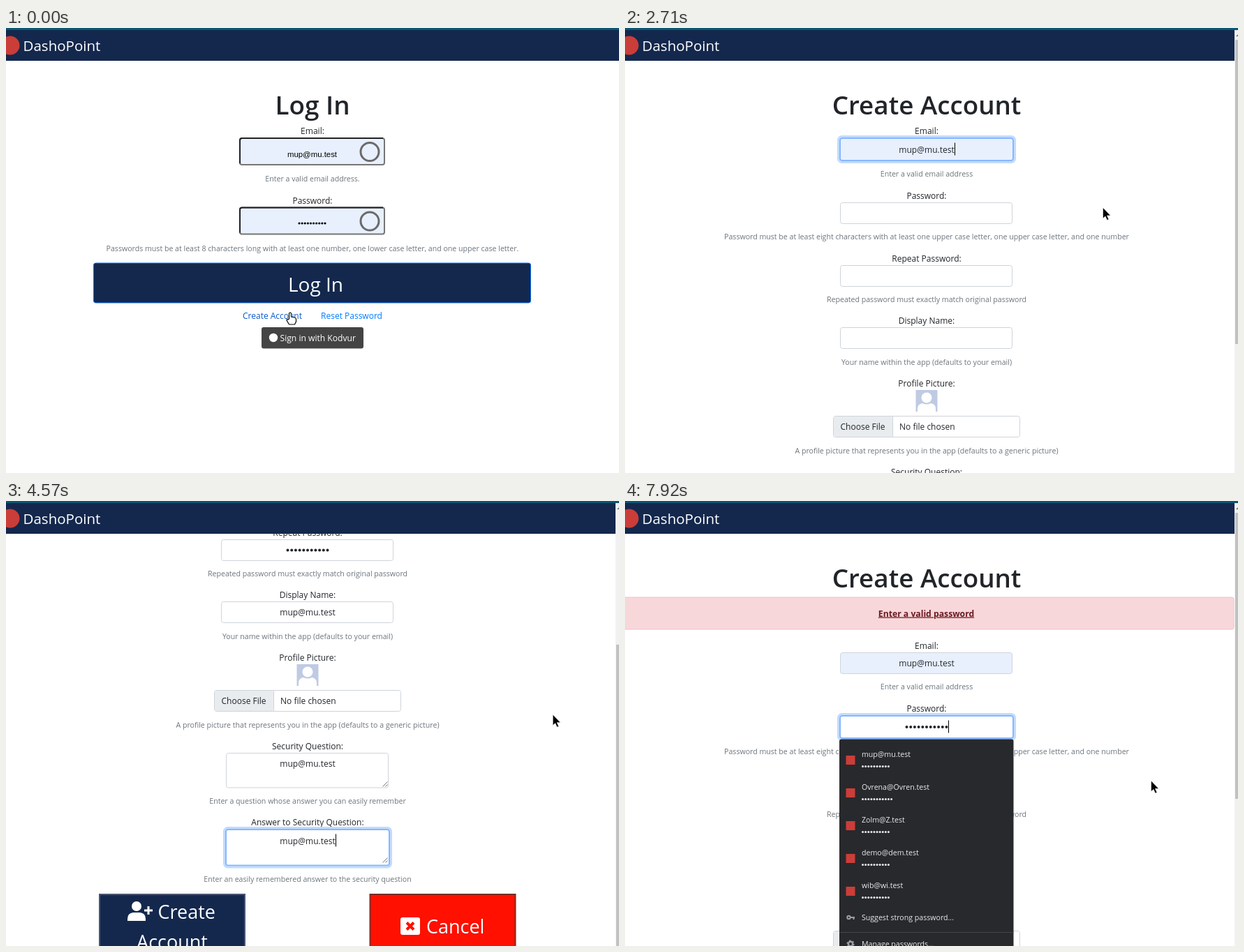
An HTML page for the animation above (8 s loop, 878 px wide and 638 px high).

```html
<!DOCTYPE html>
<html lang="en">
<head>
<meta charset="utf-8">
<title>Create account</title>
<style>
  html, body { margin: 0; width: 100%; height: 100%; overflow: hidden; background: #fff; }
  svg { display: block; font: 12px 'Open Sans', 'Noto Sans', sans-serif; }
</style>
</head>
<body>
<svg id="stage" width="878" height="638" viewBox="0 0 878 638"></svg>
<script>
const LOOP = 8000, NAVY = '#14284d', INK = '#212529', GREY = '#6c757d', RED = '#cb3d38';
const MAIL = 'mup@mu.test';
const stage = document.getElementById('stage');
const ruler = document.createElement('canvas').getContext('2d');

// Screen updates come in bursts: first time, last time, count
const ticks = [[0, 0, 1], [150, 1090, 7], [1210, 2170, 8], [2320, 3220, 8], [3370, 4300, 8],
  [4420, 5380, 8], [5500, 6530, 8], [6650, 6650, 1], [6920, 6920, 1], [7200, 7920, 6]]
  .flatMap(([a, b, n]) => Array.from({ length: n }, (_, k) => n > 1 ? a + (b - a) * k / (n - 1) : a));

// Pointer path: time, x, y
const path = [[0, 407, 408], [150, 407, 408], [933, 472, 371], [1210, 458, 250], [1347, 450, 178],
  [1621, 460, 180], [2170, 620, 272], [3091, 730, 247], [3220, 757, 246], [4557, 783, 306],
  [4831, 240, 602], [5106, 240, 602], [5380, 271, 580], [5794, 420, 440], [6090, 500, 388],
  [6383, 576, 430], [6530, 609, 428], [6650, 626, 428], [6920, 629, 428], [7920, 753, 401]];

// Focused field over time: time, field index
const focusAt = [[0, -1], [1340, 0], [2830, 1], [3360, 2], [3760, 3], [4030, 5], [4290, 6], [5100, -1], [7190, 1]];

// Label, help text, height of the row
const fields = [
  ['Email:', 'Enter a valid email address', 89.75],
  ['Password:', 'Password must be at least eight characters with at least one upper case letter, one upper case letter, and one number', 89.75],
  ['Repeat Password:', 'Repeated password must exactly match original password', 89.75],
  ['Display Name:', 'Your name within the app (defaults to your email)', 89.75],
  ['Profile Picture:', 'A profile picture that represents you in the app (defaults to a generic picture)', 127],
  ['Security Question:', 'Enter a question whose answer you can easily remember', 109],
  ['Answer to Security Question:', 'Enter an easily remembered answer to the security question', 109]];
const mails = [MAIL, 'mup2@mu.test', 'mup@m222u.test', 'm111up@mu.test', 'm333up@mu.test', 'mueoaeoup@mu.test'];
const logins = [[MAIL, 10], ['Ovrena@Ovren.test', 11], ['Zolm@Z.test', 10], ['demo@dem.test', 10], ['wib@wi.test', 10]];

const rect = (x, y, w, h, fill, more = '') =>
  `<rect x="${x}" y="${y}" width="${w}" height="${h}" fill="${fill}" ${more}/>`;
const circle = (x, y, r, fill, more = '') => `<circle cx="${x}" cy="${y}" r="${r}" fill="${fill}" ${more}/>`;
const shape = (d, fill, more = '') => `<path d="${d}" fill="${fill}" ${more}/>`;
const text = (x, y, s, size = 12, fill = INK, more = '') =>
  `<text x="${x}" y="${y}" font-size="${size}" fill="${fill}" text-anchor="middle" ${more}>${s}</text>`;
const left = (x, y, s, size, fill) => text(x, y, s, size, fill, 'style="text-anchor:start"');
const help = (x, y, s) => text(x, y, s, 10.6, GREY);
const item = (x, y, s) => left(x, y, s, 10.6, '#e8eaed');
const title = (x, s) => text(x, 124, s, 36.8, INK, 'font-weight="600"');
const dots = (x, y, n, gap, r, fill) =>
  Array.from({ length: n }, (_, i) => circle(x + gap * (i + .5), y, r, fill)).join('');
const clamp = v => Math.max(0, Math.min(1, v));
const latest = (list, t) => list.filter(e => e[0] <= t).pop();

function textWidth(s) {
  ruler.font = "12px 'Open Sans', 'Noto Sans', sans-serif";
  return ruler.measureText(s).width;
}

function loginBox(y) {
  return rect(335, y + 1, 207, 38, '#e8f0fe', 'rx="3" stroke="#767676" stroke-width="2"') +
    shape(`M335 ${y + 37}V${y + 4}q0 -3 3 -3H540`, 'none', 'stroke="#222" stroke-width="2"') +
    circle(521, y + 20.5, 13, 'none', 'stroke="#6b6b6b" stroke-width="3"');
}

function loginPage() {
  return title(439, 'Log In') + text(439, 152, 'Email:') + loginBox(157) +
    text(438.5, 184.5, MAIL, 11.4, '#000', 'font-family="Liberation Sans, sans-serif"') +
    help(439, 220, 'Enter a valid email address.') +
    text(439, 251.5, 'Password:') + loginBox(256.5) + dots(418, 280, 10, 4.1, 1.6, '#000') +
    help(439, 319.5, 'Passwords must be at least 8 characters long with at least one number, one lower case letter, and one upper case letter.') +
    rect(125.5, 337, 626, 57, NAVY, 'rx="3" stroke="#0d6efd"') + text(443.5, 377.5, 'Log In', 28, '#fff') +
    text(381.5, 416.5, 'Create Account', 12, '#0a58ca') + text(495, 416.5, 'Reset Password', 12, '#007bff') +
    rect(366, 429, 146, 30.5, '#444', 'rx="3"') + circle(383, 444, 6.2, '#fff') +
    left(392.5, 448.5, 'Sign in with Kodvur', 12.1, '#fff');
}

function avatarAndFile(y) {
  return rect(416.5, y, 31, 31, '#bfcbe3') + circle(432, y + 11, 7.5, '#fff') +
    shape(`M419 ${y + 31}v-4q0 -7 7 -8q6 3 12 0q7 1 7 8v4z`, '#fff') +
    rect(298.5, y + 37.5, 267, 30, '#fff', 'rx="3" stroke="#ced4da"') +
    rect(299, y + 38, 84, 29, '#e9ecef', 'rx="2"') + rect(383, y + 38, 1, 29, '#ced4da') +
    text(340.5, y + 57, 'Choose File') + left(393, y + 57, 'No file chosen');
}

// A field's value is a string, or a number of hidden characters
function inputBox(y, tall, on, value, fill) {
  const w = tall ? 232 : 246, h = tall ? 49.5 : 30, x = 432 - w / 2 - .5;
  const secret = typeof value === 'number', wide = secret ? value * 5.7 : textWidth(value);
  const base = y + (on ? 21.5 : 20);
  const frame = on ?
    rect(x - 3, y - 1.5, w + 7, h + 7, 'none', 'rx="5" stroke="#c2dbfe" stroke-width="3"') +
    rect(x - .5, y + 1, w + 2, h + 2, fill, 'rx="3" stroke="#86b7fe" stroke-width="2"') :
    rect(x, y + .5, w, h, fill, 'rx="3" stroke="#ced4da"');
  return frame + (secret ? dots(432 - wide / 2, base - 4.5, value, 5.7, 2, INK) : text(432, base, value)) +
    (on ? rect(Math.round(432 + wide / 2), base - 14, 1, 18, '#000') : '') +
    (tall ? shape(`M${x + w - 8} ${y + h - 1}l7 -7m-3 7l3 -3`, 'none', 'stroke="#777"') : '');
}

const popup = (y, h, body) => rect(307, y, 249.5, h, '#28292c', 'rx="3"') + body;

function mailPopup(y, picked) {
  return popup(y, 187, (picked ? rect(307, y + 7, 249.5, 29, '#3f4043') : '') +
    mails.map((m, i) => item(316.5, y + 25 + 29.1 * i, m)).join(''));
}

function loginPopup(y) {
  const rows = logins.map(([m, n], i) => {
    const r = y + 47 * i;
    return rect(316.5, r + 23.5, 13, 13, RED) + item(339, r + 25, m) +
      dots(338.5, r + 39, n, 4.1, 1.5, '#e8eaed');
  }).join('');
  const key = circle(320.5, y + 255.5, 2.2, 'none', 'stroke="#9aa0a6" stroke-width="2"') +
    shape(`M323 ${y + 255.5}h6m-1.5 0v3`, 'none', 'stroke="#9aa0a6" stroke-width="2"');
  const gear = circle(323, y + 293.5, 3.2, 'none', 'stroke="#9aa0a6" stroke-width="2.4"') +
    circle(323, y + 293.5, 4.8, 'none', 'stroke="#9aa0a6" stroke-width="1.4" stroke-dasharray="2.5 2.5"');
  return popup(y, 309.5, rows + key + item(339, y + 259.5, 'Suggest strong password...') +
    rect(307, y + 276.5, 249.5, 1, '#44464a') + gear + item(339, y + 297.5, 'Manage passwords...'));
}

function buttons(y) {
  return rect(134, y + 1, 208, 100, NAVY, 'stroke="#4a5672" stroke-width="2"') +
    circle(187, y + 18, 7, '#fff') + shape(`M174 ${y + 39}v-3q0 -8 8 -9h10q8 1 8 9v3z`, '#fff') +
    shape(`M198 ${y + 24}h12m-6 -6v12`, 'none', 'stroke="#fff" stroke-width="3"') +
    left(217.5, y + 36, 'Create', 27, '#fff') + text(238, y + 79, 'Account', 27, '#fff') +
    rect(521.5, y + 1, 208, 100, '#ff1000', 'stroke="#7d2a25" stroke-width="2"') +
    rect(565, y + 34, 28, 25, '#fff', 'rx="3"') +
    shape(`M574 ${y + 41.5}l10 10m0 -10l-10 10`, 'none', 'stroke="#ff1000" stroke-width="4"') +
    left(602, y + 57, 'Cancel', 27, '#fff');
}

function alertBar(focused) {
  return rect(-4, 138, 876, 46, '#f8d7da', 'rx="3" stroke="#f1c1c6"') +
    (focused ? rect(361.5, 151, 141, 20, 'none', 'rx="2" stroke="#6c9be0" stroke-width="2.5"') : '') +
    text(431.5, 165.5, 'Enter a valid password', 12.2, '#6a1a21', 'font-weight="700" text-decoration="underline"');
}

function formPage(t) {
  const focus = latest(focusAt, t)[1], failed = t > 5100, filled = t > 2440;
  const scroll = t > 4030 && t < 5100 ? 282 : 0;
  const values = [
    filled ? MAIL : t > 2030 ? MAIL[0] : '',
    Math.round(11 * clamp((t - 7344) / 576)),
    Math.round(11 * clamp((t - 3370) / 266)),
    t > 3900 ? MAIL : '', '', t > 4160 ? MAIL : '', t > 4410 ? MAIL : ''];
  let y = failed ? 217 : 157, over = '';
  let out = title(432, 'Create Account') + (failed ? alertBar(focus < 0) : '');
  fields.forEach(([label, hint, step], i) => {
    const on = focus === i, top = Math.round(y);
    out += text(432, top - 5, label) + (i === 4 ? avatarAndFile(top) :
      inputBox(top, i > 4, on, values[i], i === 0 && filled ? '#e8f0fe' : '#fff'));
    if (on && i === 0 && t > 1890 && t < 2570) over = mailPopup(top + 35, filled);
    if (on && i === 1) over = loginPopup(top + 34.5);
    if (on) y += 3;
    out += help(432, y + step - 36.5, hint);
    y += step;
  });
  out += buttons(y - 19);
  return `<g transform="translate(0 ${-scroll})">${out}${over}</g>` +
    rect(873, 3, 5, 635, '#f1f1f1') + shape('M875 12l3 -3v3z', '#777') +
    rect(874, 17 + scroll * .67, 4, failed ? 410 : 436, '#c1c1c1');
}

function pointer(t) {
  const i = Math.max(1, path.findIndex(p => p[0] >= t));
  const [t0, x0, y0] = path[i - 1], [t1, x1, y1] = path[i];
  const k = clamp((t - t0) / (t1 - t0));
  const hand = t < 460 || t > 4800 && t < 5100;
  return `<g transform="translate(${x0 + (x1 - x0) * k} ${y0 + (y1 - y0) * k})">` + (hand ?
    shape('M-1.5 9V1q1.5 -2 3 0V6l5 1q2 .5 2 3v3l-2 4H-1.5l-3.5 -6q0 -2 2 -1z', '#fff', 'stroke="#000" stroke-width="1.2"') :
    shape('M.5 0V15.5L4 12.5L6.5 18L9 17L6.5 11.5H11.5Z', '#000', 'stroke="#fff" stroke-width=".6"')) + '</g>';
}

function scene(t) {
  const login = t < 460;
  return (login ? loginPage() : formPage(t)) +
    rect(0, 3, login ? 878 : 873, 44, NAVY) + rect(0, 0, 878, 3, '#0b5673') +
    circle(6, 25, 13.5, RED) + left(24.5, 33, 'DashoPoint', 20.5, '#fff') + pointer(t);
}

let shown = -1;
function frame(now) {
  const t = now % LOOP;
  const tick = ticks.filter(v => v <= t).pop();
  if (tick !== shown) stage.innerHTML = scene(shown = tick);
  requestAnimationFrame(frame);
}
frame(0);
</script>
</body>
</html>
```
